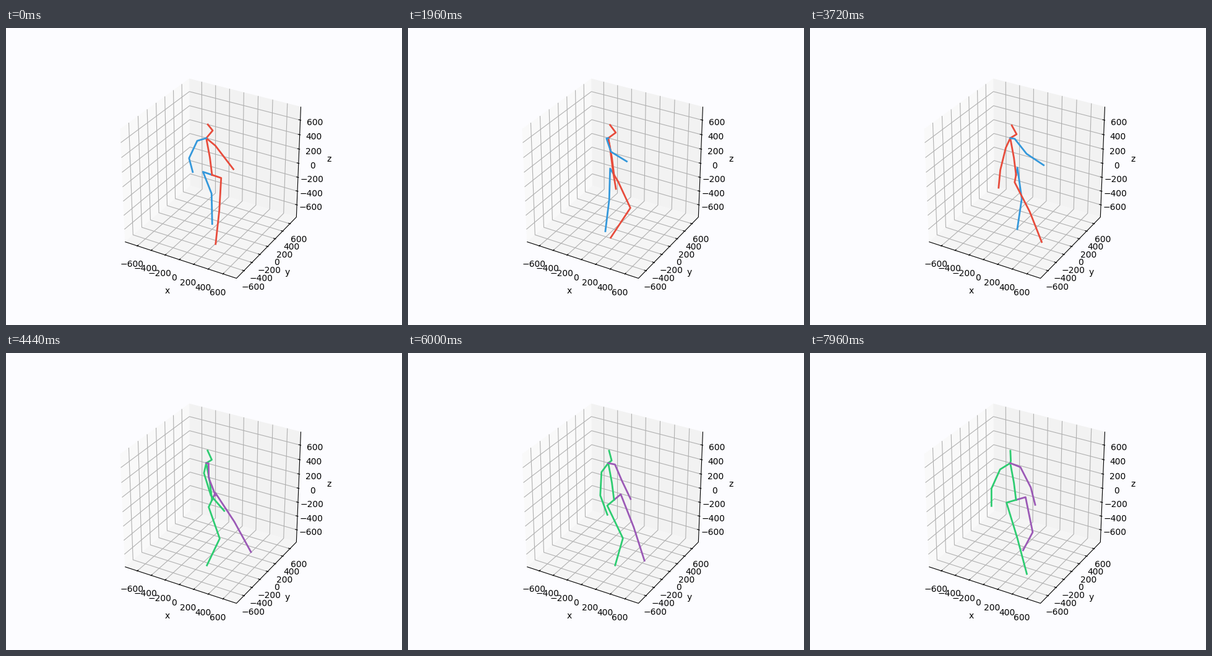
Animation of 640x480 px, one loop 8 s. Source, as a matplotlib script:

```python
import numpy as np
import matplotlib.pyplot as plt
from matplotlib.animation import FuncAnimation
from matplotlib.collections import LineCollection

W, H, FRAMES, STEP = 640, 480, 200, 40
SWITCH = 100                      # the walker changes colour here
EDGE = 781.25                     # half size of the box
TICKS = range(-600, 601, 200)
CENTER = np.array([332.995, 237.405])
SCALE = 369.6 / 0.185
COLORS = [("#3498db", "#e74c3c"), ("#9b59b6", "#2ecc71")]
PANES = ["#f9f9f9", "#f2f2f2", "#f5f5f5"]

# Camera basis
EL, AZ = np.radians(30), np.radians(-60)
RIGHT = np.array([-np.sin(AZ), np.cos(AZ), 0])
UP = np.array([-np.sin(EL) * np.cos(AZ), -np.sin(EL) * np.sin(AZ), np.cos(EL)])
TOWARD = np.array([np.cos(EL) * np.cos(AZ), np.cos(EL) * np.sin(AZ), np.sin(EL)])


def project(*xyz):
    p = np.array(xyz) / 1500
    k = SCALE / (10 - p @ TOWARD)
    return CENTER + k * np.array([p @ RIGHT, -(p @ UP)])


fig = plt.figure(figsize=(W / 100, H / 100), dpi=100, facecolor="#fcfcff")
ax = fig.add_axes([0, 0, 1, 1])
ax.set_xlim(0, W)
ax.set_ylim(H, 0)
ax.axis("off")


def label(pos, text, va):
    ax.text(*project(*pos), text, ha="center", va=va, fontsize=10,
            family="DejaVu Sans", zorder=2)


def draw_box():
    e = EDGE
    corners = [
        [(-e, -e, -e), (-e, e, -e), (-e, e, e), (-e, -e, e)],
        [(-e, e, -e), (e, e, -e), (e, e, e), (-e, e, e)],
        [(-e, -e, -e), (e, -e, -e), (e, e, -e), (-e, e, -e)],
    ]
    for pane, color in zip(corners, PANES):
        pts = np.array([project(*c) for c in pane])
        ax.fill(pts[:, 0], pts[:, 1], color=color, lw=0, zorder=0)

    grid, dark = [], []
    for v in TICKS:
        grid.append([project(v, -e, -e), project(v, e, -e), project(v, e, e)])
        grid.append([project(e, v, -e), project(-e, v, -e), project(-e, v, e)])
        grid.append([project(-e, -e, v), project(-e, e, v), project(e, e, v)])
        dark.append([project(v, -e - 12.5, -e), project(v, -e + 25, -e)])
        dark.append([project(e + 12.5, v, -e), project(e - 25, v, -e)])
        dark.append([project(e + 12.5, e, v), project(e - 25, e, v)])
    dark.append([project(-e, -e, -e), project(e, -e, -e),
                 project(e, e, -e), project(e, e, e)])
    ax.add_collection(LineCollection(grid, colors="#b0b0b0", linewidths=0.8, zorder=1))
    ax.add_collection(LineCollection(dark, colors="black", linewidths=0.8, zorder=2))

    far = e + 129.65
    for v in TICKS:
        text = str(v).replace("-", "\u2212")
        label((v, -far, -far), text, "top")
        label((far, v, -far), text, "top")
        label((far, far, v), text, "top")
    far = e + 281.85
    label((0, -far, -far), "x", "center")
    label((far, 0, -far), "y", "center")
    label((far, far, 0), "z", "center")


Z = np.array([0, 0, 1.0])


def wave(cycles):
    return np.cos(2 * np.pi * cycles)


def facing(deg):
    """Forward and left unit vectors for a heading."""
    a = np.radians(deg)
    return np.array([np.cos(a), np.sin(a), 0]), np.array([-np.sin(a), np.cos(a), 0])


def bone(length, pitch, fwd, out=0 * Z, spread=0):
    """Hanging bone, swung forward by pitch and outward by spread."""
    a, s = np.radians([pitch, spread])
    return length * (np.cos(s) * (np.sin(a) * fwd - np.cos(a) * Z) + np.sin(s) * out)


def walker(t):
    """Chains of joints in mm, pelvis at the origin: list of (points, side)."""
    hump = np.sin(np.pi * t / 8)
    u = np.clip((t - 3) / 2, 0, 1)
    crouch = u * u * (3 - 2 * u)          # later steps are bent further forward
    heading = 86 - 14.6 * t - 9 * hump
    cycle = 0.715 * t - 0.59
    swing = wave(cycle)

    hips = facing(heading)
    chest = facing(heading - 6 - 13 * swing)
    gaze, _ = facing(heading - 25)

    root = 0 * Z
    spine = np.array([-30, 0, 232])
    thorax = np.array([-80, 0, 485])
    neck = thorax + 90 * gaze + 78 * Z
    head = neck - 68 * gaze + 100 * Z

    def leg(side):
        p = cycle + (0.5 if side > 0 else 0)
        thigh = 10 + 15 * wave(p + 0.08) + 20 * crouch
        bend = 5 + 55 * np.exp(3.5 * (wave(p - 0.78 + 0.14 * crouch) - 1))
        hip = side * 133 * (hips[1] + 0.2 * hump * Z)
        knee = hip + bone(443, thigh, hips[0])
        return [root, hip, knee, knee + bone(454, thigh - bend, hips[0])]

    def arm(side):
        s = side * swing
        shoulder = thorax + side * 125 * chest[1] - 70 * Z
        elbow = shoulder + bone(279, 10 + 17 * s, chest[0], side * chest[1], 22)
        wrist = elbow + bone(252, 30 + 12 * side + 26 * s, chest[0])
        return [thorax, shoulder, elbow, wrist]

    return [(leg(1), 0), (leg(-1), 1), ([root, spine, thorax, neck, head], 1),
            (arm(-1), 1), (arm(1), 0)]


draw_box()
lines = [ax.plot([], [], lw=2, zorder=3)[0] for _ in walker(0)]


def update(n):
    colors = COLORS[n >= SWITCH]
    for line, (chain, side) in zip(lines, walker(n * STEP / 1000)):
        pts = np.array([project(*p) for p in chain])
        line.set_data(pts[:, 0], pts[:, 1])
        line.set_color(colors[side])
    return lines


anim = FuncAnimation(fig, update, frames=FRAMES, interval=STEP,
                     repeat=True, repeat_delay=0, blit=False)
plt.show()
```
